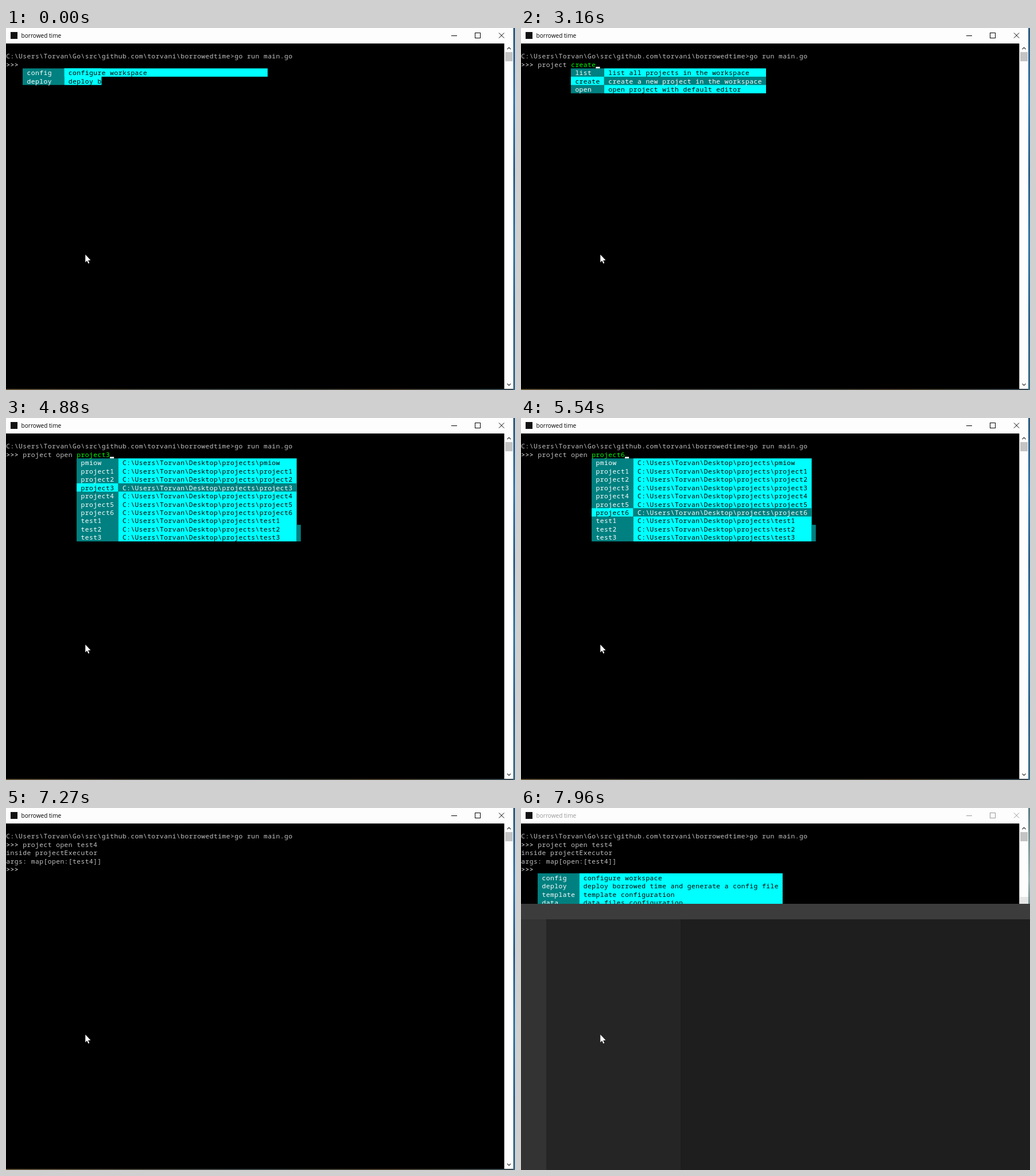
Animation of 887 by 631 pixels, one loop 8000 ms. Source, as an HTML page with a canvas:

```html
<!DOCTYPE html>
<html lang="en">
<head>
<meta charset="utf-8">
<title>borrowed time</title>
<style>
  html, body { margin: 0; width: 100%; height: 100%; overflow: hidden; background: #000; }
  canvas { display: block; }
</style>
</head>
<body>
<canvas id="stage" width="887" height="631"></canvas>
<script>
const W = 887, H = 631, LOOP = 8000;
// The console is an 8 x 16 cell grid, shown slightly reduced.
const CELL_W = 7.235, CELL_H = 2 * CELL_W, LEFT = 0.1, TOP = 27, BASELINE = 11.75;
const CYAN = '#00ffff', TEAL = '#008080', GRAY = '#c0c0c0', GREEN = '#00ff00';
const ctx = document.getElementById('stage').getContext('2d');

const USER = 'C:\\Users\\Torvan';
const COMMAND = USER + '\\Go\\src\\github.com\\torvani\\borrowedtime>go run main.go';

const MAIN = [
  ['config', 'configure workspace'],
  ['deploy', 'deploy borrowed time and generate a config file'],
  ['template', 'template configuration'],
  ['data', 'data files configuration'],
  ['project', 'project configuration'],
  ['exit', 'exit the application']
];
const PROJECT = [
  ['list', 'list all projects in the workspace'],
  ['create', 'create a new project in the workspace'],
  ['open', 'open project with default editor']
];
const series = (word, n) => Array.from({ length: n }, (_, i) => word + (i + 1));
const FOLDERS = ['pmiow', ...series('project', 6), ...series('test', 4)]
  .map(name => [name, USER + '\\Desktop\\projects\\' + name]);
const VISIBLE = 10;

// Each step: start time, typed text, menu, selected index, extras.
const steps = [];
const step = (at, typed, menu, sel = -1, extra = {}) =>
  steps.push({ at, typed, menu, sel, ...extra });

step(0, '', MAIN, -1, { cut: [1, 9], drawing: true });
step(120, '', MAIN, 3);
step(360, '', MAIN, 4);
step(920, 'project ', []);
step(1040, 'project ', PROJECT);
[[1480, 0], [2220, 1], [2710, 0], [3160, 1], [3270, 2]]
  .forEach(([at, sel]) => step(at, 'project ', PROJECT, sel));

const OPEN = 'project open ';
step(3740, OPEN, FOLDERS);
step(4090, OPEN, FOLDERS, 0, { drawing: true });
[4210, 4540, 4780, 4880, 5090, 5300, 5540].forEach((at, i) => step(at, OPEN, FOLDERS, i));
step(5640, OPEN, FOLDERS, 7, { cut: [8, 20], drawing: true });
[5740, 5850, 6090, 6330].forEach((at, i) => step(at, OPEN, FOLDERS, 7 + i));

const done = { finished: true, drawing: true };
const leaving = { ...done, inactive: true };
step(7270, '', [], -1, done);
step(7390, '', MAIN, -1, done);
step(7500, '', MAIN, -1, leaving);
step(7620, '', MAIN, -1, { ...leaving, editor: { y: 180, alpha: 0.45 } });
step(7740, '', MAIN, -1, { ...leaving, editor: { y: 170, alpha: 0.86 } });
step(7860, '', MAIN, -1, { ...leaving, editor: { y: 168, alpha: 0.98 } });
step(7960, '', MAIN, -1, { ...leaving, editor: { y: 167, alpha: 1, painted: true } });

const colX = col => LEFT + col * CELL_W;
const rowY = row => TOP + row * CELL_H;

function rect(x, y, w, h, color) {
  ctx.fillStyle = color;
  ctx.fillRect(x, y, w, h);
}

function cells(col, row, cols, rows, color) {
  rect(colX(col), rowY(row), cols * CELL_W, rows * CELL_H, color);
}

function text(str, col, row, color) {
  ctx.font = '11.3px "Noto Sans Mono", monospace';
  ctx.fillStyle = color;
  ctx.textAlign = 'center';
  [...str].forEach((ch, i) => ctx.fillText(ch, colX(col + i + 0.5), rowY(row) + BASELINE));
}

function line(points, color, width = 1) {
  ctx.strokeStyle = color;
  ctx.lineWidth = width;
  ctx.beginPath();
  points.forEach(([x, y]) => ctx.lineTo(x, y));
  ctx.stroke();
}

function gradient(x, y, w, h, vertical, colors) {
  const g = vertical ? ctx.createLinearGradient(0, y, 0, y + h)
                     : ctx.createLinearGradient(x, 0, x + w, 0);
  colors.forEach((c, i) => g.addColorStop(i / (colors.length - 1), c));
  rect(x, y, w, h, g);
}

function drawWindow(inactive) {
  const ink = inactive ? '#999' : '#000';
  rect(0, 0, W, H, '#000');
  rect(0, 0, 884, TOP, '#fdfdfd');
  rect(8, 7, 12, 12, '#111');
  ctx.font = '10.1px "Open Sans", sans-serif';
  ctx.textAlign = 'left';
  ctx.fillStyle = ink;
  ctx.fillText('borrowed time', 26.5, 17);

  line([[776, 13.5], [786, 13.5]], ink);
  ctx.strokeRect(817.5, 8.5, 9, 9);
  line([[859, 8.5], [868, 17.5]], ink);
  line([[868, 8.5], [859, 17.5]], ink);

  const barX = colX(120);
  rect(barX, TOP, 884 - barX, 602, '#fdfdfd');
  rect(870, 42, 13, 16, '#c4c4c4');
  line([[873.5, 37], [876.5, 34], [879.5, 37]], '#505050', 1.5);
  line([[873.5, 620], [876.5, 623], [879.5, 620]], '#505050', 1.5);

  // Desktop showing at the right and bottom edges.
  gradient(884, 0, 3, H, true, inactive
    ? ['#5a7c80', '#9cb6b4', '#303c44', '#4a4038', '#30383e', '#364a50']
    : ['#2c5a80', '#2f78b0', '#28608c', '#3078a8', '#2a648e', '#3a6c88']);
  gradient(0, 629.3, 884, 1.7, false, ['#6b5a3c', '#4d4a40', '#3e4a4c', '#51442f', '#3c4f5a']);
}

function drawMenu(menu, sel, col, row, cut) {
  if (!menu.length) return;
  const labelW = Math.max(...menu.map(m => m[0].length)) + 2;
  const noteW = Math.max(...menu.map(m => m[1].length)) + 2;
  const noteCol = col + labelW;
  const first = Math.max(0, sel - VISIBLE + 1);
  const rows = menu.slice(first, first + VISIBLE);
  const [fullRows, cutW] = cut || [rows.length, 0];
  const shown = rows.slice(0, cut ? fullRows + 1 : fullRows);

  cells(noteCol, row, noteW, fullRows, CYAN);
  if (cut) cells(noteCol, row, cutW, shown.length, CYAN);
  cells(col, row, labelW, shown.length, TEAL);
  if (menu.length > VISIBLE && !cut) cells(noteCol + noteW, row + VISIBLE - 2, 1, 2, TEAL);

  shown.forEach(([label, note], i) => {
    const picked = first + i === sel;
    if (picked) {
      cells(col, row + i, labelW, 1, CYAN);
      cells(noteCol, row + i, noteW, 1, TEAL);
    }
    const visibleNote = i < fullRows ? note : note.slice(0, cutW - 1);
    text(label, col + 1, row + i, picked ? '#000' : '#fff');
    text(visibleNote, noteCol + 1, row + i, picked ? '#fff' : '#000');
  });
}

function drawTerminal(s) {
  text(COMMAND, 0, 1, GRAY);
  let row = 2;
  if (s.finished) {
    text('>>>', 0, 2, '#fff');
    text('project open test4', 4, 2, GRAY);
    text('inside projectExecutor', 0, 3, GRAY);
    text('args: map[open:[test4]]', 0, 4, GRAY);
    row = 5;
  }
  const col = 4 + s.typed.length;
  text('>>>', 0, row, '#fff');
  text(s.typed, 4, row, GRAY);
  drawMenu(s.menu, s.sel, col, row + 1, s.cut);
  if (s.drawing) return;
  const preview = s.sel < 0 ? '' : s.menu[s.sel][0];
  text(preview, col, row, GREEN);
  rect(colX(col + preview.length), rowY(row) + BASELINE, CELL_W, CELL_H - BASELINE, '#fff');
}

function drawEditor({ y, alpha, painted }) {
  rect(869, y - 12, 15, 12, '#e6e6e6');
  if (!painted) {
    rect(0, y, W, H - y, `rgba(0,0,0,${alpha})`);
    return;
  }
  rect(0, y, W, H - y, '#1e1e1e');
  rect(0, y, W, 27, '#3c3c3c');
  rect(0, y + 27, 44, H, '#333333');
  rect(44, y + 27, 234, H, '#252526');
}

function drawPointer() {
  ctx.beginPath();
  [[138.3, 395], [138.3, 408.5], [141.2, 405.6], [143.4, 410.6], [145.3, 409.8], [143.1, 404.9], [147.5, 404.7]]
    .forEach(([x, y]) => ctx.lineTo(x, y));
  ctx.fillStyle = '#fff';
  ctx.fill();
}

function frame(now) {
  const t = now % LOOP;
  const s = steps.findLast(item => item.at <= t) || steps[0];
  drawWindow(s.inactive);
  drawTerminal(s);
  if (s.editor) drawEditor(s.editor);
  drawPointer();
  requestAnimationFrame(frame);
}
requestAnimationFrame(frame);
</script>
</body>
</html>
```
